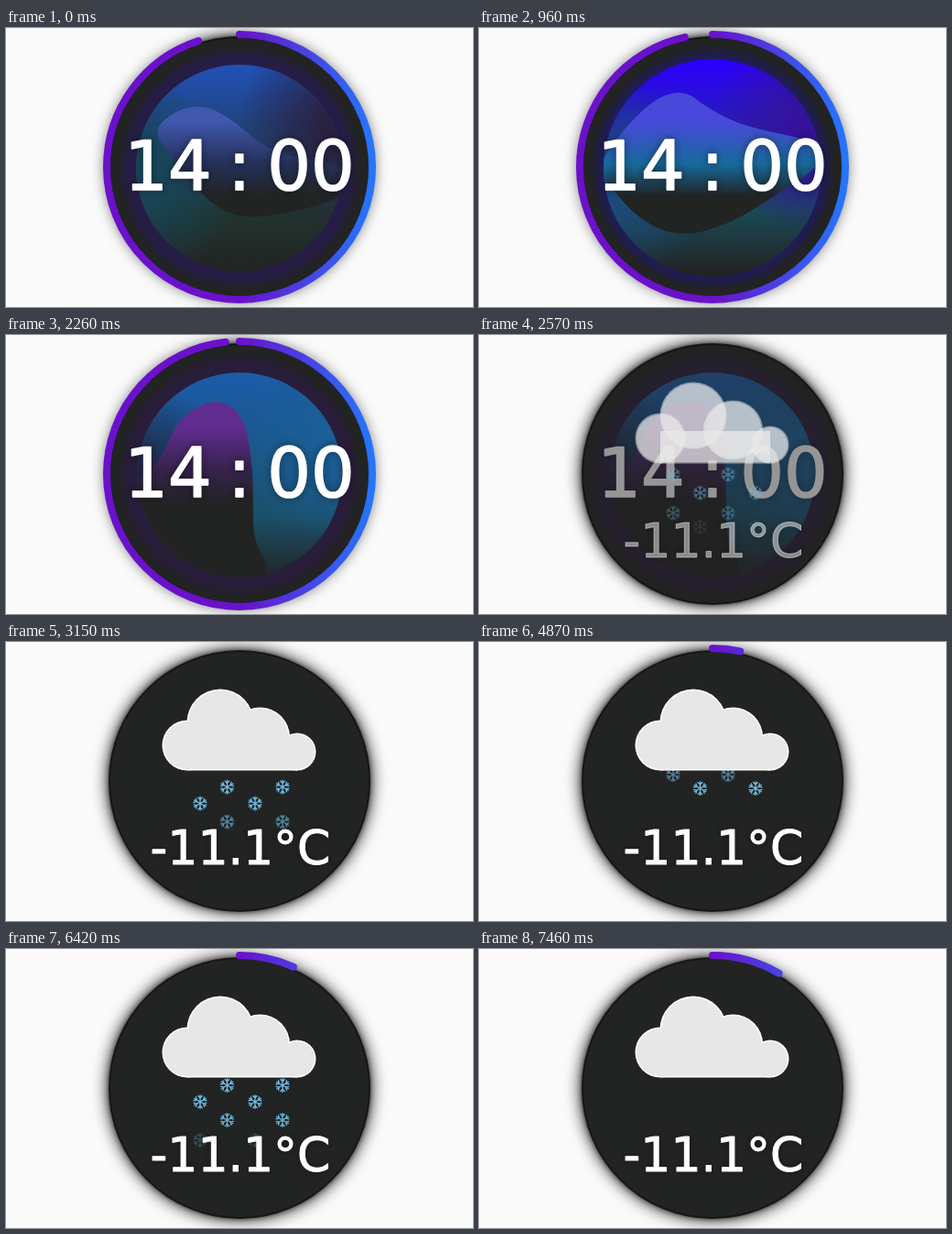
Write an HTML page with a canvas that moves like this. It is 510 by 305 pixels and loops after 8 s.

```html
<!DOCTYPE html>
<html lang="en">
<head>
<meta charset="utf-8">
<style>
  html, body { margin: 0; width: 100%; height: 100%; overflow: hidden; background: #fafafa; }
  canvas { display: block; }
</style>
</head>
<body>
<canvas id="stage" width="510" height="305"></canvas>
<script>
const ctx = document.getElementById('stage').getContext('2d');
const LOOP = 8000, CX = 255, CY = 152, DARK = '#222323';
const FONT = '"DejaVu Sans", sans-serif';

// Poses of the glass orb; everything between them is blended.
const poses = [
  { at: 0, r: 113, top: '#2150b8', low: '#20352f', left: '#17465a', right: '#2a2142',
    rim: '#251d45', crest: '#4058ae', mid: '#253058',
    edge: [160,112, 185,90, 215,84, 245,98, 290,138, 375,150, 372,184, 320,200, 262,209, 230,197, 203,170, 180,140] },
  { at: 960, r: 119, top: '#2c00fa', low: '#1a4a55', left: '#1c4a80', right: '#35129a',
    rim: '#1f1c55', crest: '#4848da', mid: '#176a9c',
    edge: [128,148, 183,82, 222,66, 250,88, 290,108, 376,125, 374,150, 325,182, 275,214, 220,229, 175,210, 142,172] },
  { at: 2260, r: 112, top: '#1c5cab', low: '#1a5068', left: '#1f2440', right: '#1a5f98',
    rim: '#281d3a', crest: '#602c90', mid: '#35224a',
    edge: [168,140, 188,90, 230,68, 260,88, 269,140, 270,180, 270,225, 290,258, 260,285, 190,280, 120,240, 130,170] }
];

const clamp = v => Math.max(0, Math.min(1, v));
const lerp = (a, b, u) => a + (b - a) * u;
const rgb = h => [1, 3, 5].map(i => parseInt(h.slice(i, i + 2), 16));

function blend(a, b, u) {
  if (Array.isArray(a)) return a.map((v, i) => lerp(v, b[i], u));
  if (typeof a === 'number') return lerp(a, b, u);
  const to = rgb(b);
  return '#' + rgb(a).map((v, i) => Math.round(lerp(v, to[i], u)).toString(16).padStart(2, '0')).join('');
}

function poseAt(t) {
  const i = t < poses[1].at ? 0 : 1, a = poses[i], b = poses[i + 1];
  const u = clamp((t - a.at) / (b.at - a.at)), out = {};
  for (const key in a) out[key] = blend(a[key], b[key], u);
  return out;
}

function disc(x, y, r, fill) {
  ctx.beginPath();
  ctx.arc(x, y, r, 0, 2 * Math.PI);
  ctx.fillStyle = fill;
  ctx.fill();
}

function shade(g, ...stops) {
  stops.forEach(([pos, col]) => g.addColorStop(pos, col));
  return g;
}

const glow = (x, y, r0, r1, col) =>
  shade(ctx.createRadialGradient(x, y, r0, x, y, r1), [0, col], [1, col + '00']);

// Closed smooth curve through the midpoints of the given points.
function blob(p) {
  const n = p.length;
  ctx.beginPath();
  ctx.moveTo((p[n - 2] + p[0]) / 2, (p[n - 1] + p[1]) / 2);
  for (let i = 0; i < n; i += 2) {
    const x = p[(i + 2) % n], y = p[(i + 3) % n];
    ctx.quadraticCurveTo(p[i], p[i + 1], (p[i] + x) / 2, (p[i + 1] + y) / 2);
  }
}

function drawOrb(t) {
  const p = poseAt(t), cy = 153;
  disc(CX, cy, 133, glow(CX, cy, 122, 133, p.rim));
  ctx.save();
  ctx.beginPath();
  ctx.arc(CX, cy, p.r, 0, 2 * Math.PI);
  ctx.clip();
  ctx.fillStyle = shade(ctx.createLinearGradient(0, 40, 0, 268), [0, p.top], [0.7, p.low], [1, DARK]);
  ctx.fillRect(100, 0, 310, 305);
  disc(145, 165, 110, glow(145, 165, 15, 110, p.left));
  disc(365, 110, 115, glow(365, 110, 20, 115, p.right));
  blob(p.edge);
  ctx.fillStyle = shade(ctx.createLinearGradient(0, 72, 0, 190),
    [0, p.crest], [0.25, p.crest], [0.65, p.mid], [0.95, DARK]);
  ctx.fill();
  ctx.restore();
}

function label(text, x, y, size, weight) {
  ctx.save();
  ctx.font = `${size}px ${FONT}`;
  ctx.textAlign = 'center';
  ctx.lineJoin = 'round';
  ctx.lineWidth = weight;
  ctx.fillStyle = ctx.strokeStyle = '#fff';
  ctx.shadowColor = '#000';
  ctx.shadowBlur = 8;
  ctx.strokeText(text, x, y);
  ctx.shadowColor = 'transparent';
  ctx.fillText(text, x, y);
  ctx.restore();
}

function drawFlake(x, y, alpha) {
  ctx.save();
  ctx.globalAlpha *= alpha;
  ctx.translate(x, y);
  ctx.strokeStyle = '#72bfe6';
  ctx.lineWidth = 1.3;
  ctx.lineCap = 'round';
  ctx.beginPath();
  for (let i = 0; i < 6; i++) {
    ctx.moveTo(0, 0);
    ctx.lineTo(0, -7.4);
    ctx.moveTo(-2.3, -6.6);
    ctx.lineTo(0, -4.2);
    ctx.lineTo(2.3, -6.6);
    ctx.rotate(Math.PI / 3);
  }
  ctx.stroke();
  ctx.restore();
}

function drawSnow(t) {
  if (t > 7425) return;
  const u = (t + 3075) % 3500;
  [0, 15, 37, 57, 75].forEach((lag, i) => {
    const y = 160 + 0.0413 * (u - 945) - lag;
    const alpha = Math.min(clamp((y - 138) / 11), clamp((219 - y) / 34));
    if (alpha > 0) for (const x of i % 2 ? [212, 272] : [241.5, 302]) drawFlake(x, y, alpha);
  });
}

function drawCloud() {
  for (const [grow, fill] of [[0.5, '#fff'], [-1, '#e7e7e7']]) {
    disc(198, 113, 27 + grow, fill);
    disc(234, 88, 36 + grow, fill);
    disc(277.5, 104, 32 + grow, fill);
    disc(318, 120, 20 + grow, fill);
    ctx.fillRect(198, 105, 120, 35 + grow);
  }
}

function drawRing(t) {
  const angle = (342 + 6 * Math.floor((t + 660) / 1000)) % 360;
  if (!angle) return;
  ctx.beginPath();
  ctx.arc(CX, CY, 145, -Math.PI / 2, (angle - 90) * Math.PI / 180);
  ctx.strokeStyle = shade(ctx.createLinearGradient(CX, 0, 400, 0), [0, '#6a11cb'], [1, '#2575fc']);
  ctx.lineWidth = 8;
  ctx.lineCap = 'round';
  ctx.stroke();
}

function draw(t) {
  const fade = clamp((t - 2380) / 400);
  ctx.fillStyle = '#fafafa';
  ctx.fillRect(0, 0, 510, 305);
  ctx.save();
  ctx.shadowColor = '#000';
  ctx.shadowBlur = 18;
  disc(CX, CY, 143, DARK);
  ctx.restore();
  ctx.save();
  ctx.shadowColor = '#000';
  ctx.shadowBlur = 6;
  disc(CX, CY, 141, DARK);
  ctx.restore();
  if (fade < 1) {
    drawOrb(t);
    label('14', 177, 177, 75, 1.6);
    label(':', 255, 177, 75, 1.6);
    label('00', 333, 177, 75, 1.6);
  }
  if (fade > 0) {
    ctx.globalAlpha = fade;
    disc(CX, CY, 141, DARK);
    drawSnow(t);
    drawCloud();
    label('-11.1°C', 256, 242.5, 52, 1);
    ctx.globalAlpha = 1;
  }
  drawRing(t);
}

const start = performance.now();
function tick() {
  draw((performance.now() - start) % LOOP);
  requestAnimationFrame(tick);
}
tick();
</script>
</body>
</html>
```
